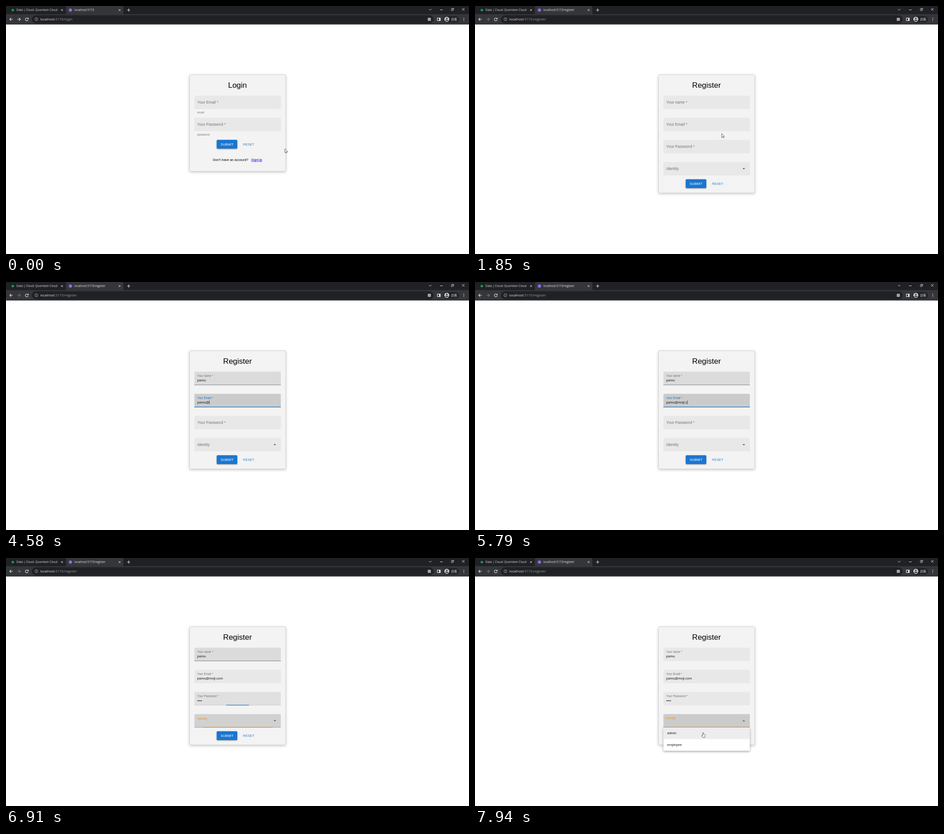
These frames come from a looping animation (1021 px wide and 549 px high, 8000 ms). An HTML page with a canvas:

```html
<!DOCTYPE html>
<html lang="en">
<head>
<meta charset="utf-8">
<title>Register form</title>
<style>
html, body { margin: 0; width: 100%; height: 100%; overflow: hidden; background: #fff; }
canvas { display: block; }
</style>
</head>
<body>
<canvas id="stage" width="1021" height="549"></canvas>
<script>
const ctx = document.getElementById('stage').getContext('2d');
const LOOP = 8000, OPEN_PAGE = 1620, OPEN_MENU = 7580;
const SANS = '"Liberation Sans", Arial, sans-serif';
const UI = '"Open Sans", "Noto Sans CJK TC", "Noto Sans CJK", sans-serif';
const BLUE = '#1976d2', ORANGE = '#f0981c';

const fields = [
  { label: 'Your name *', value: 'pamu', focus: 2320, blur: 3714, hover: [1950, 7370],
    keys: [2800, 2960, 3210, 3370] },
  { label: 'Your Email *', value: 'pamu@mojl.com', focus: 3700, blur: 6154,
    keys: [3860, 3940, 4010, 4090, 4580, 4900, 5060, 5220, 5470, 5630, 5790, 5890, 6040] },
  { label: 'Your Password *', value: '••••', focus: 6140, blur: 6834,
    keys: [6430, 6510, 6590, 6750] },
  { label: 'Identity', value: '', focus: 6820, blur: Infinity, keys: [], select: true }
];

// time, x, y of the pointer tip
const path = [
  [100, 615, 316], [890, 545.5, 341], [960, 546.5, 342.5], [1040, 548, 344],
  [OPEN_PAGE, 548, 344], [2090, 540, 217], [7310, 540, 217],
  [7540, 506, 360], [7660, 505, 361], [7940, 503, 386.5]
];

const lerp = (a, b, p) => a + (b - a) * p;
const clamp = p => Math.max(0, Math.min(1, p));

// cubic-bezier(0, 0, .2, 1)
function easeOut(x) {
  if (x <= 0 || x >= 1) return clamp(x);
  let lo = 0, hi = 1, s;
  for (let i = 0; i < 18; i++) {
    s = (lo + hi) / 2;
    if (.6 * (1 - s) * s * s + s ** 3 < x) lo = s; else hi = s;
  }
  return 3 * (1 - s) * s * s + s ** 3;
}
const ramp = (t, start, ms = 200) => easeOut((t - start) / ms);
const pulse = (t, on, off) => ramp(t, on) * (1 - ramp(t, off));

function rect(x, y, w, h, color, radius = 0) {
  ctx.fillStyle = color;
  ctx.beginPath();
  ctx.roundRect(x, y, w, h, radius);
  ctx.fill();
}

function circle(x, y, r, color) {
  ctx.fillStyle = color;
  ctx.beginPath();
  ctx.arc(x, y, r, 0, 7);
  ctx.fill();
}

function text(str, x, y, size, color, font = SANS, align = 'left') {
  ctx.font = `${size}px ${font}`;
  ctx.textAlign = align;
  ctx.fillStyle = color;
  ctx.fillText(str, x, y);
}

function stroke(d, x, y, color, width = 1) {
  ctx.save();
  ctx.translate(x, y);
  ctx.strokeStyle = color;
  ctx.lineWidth = width;
  ctx.stroke(new Path2D(d));
  ctx.restore();
}

function shadow(blur, y, color) {
  ctx.shadowBlur = blur;
  ctx.shadowOffsetY = y;
  ctx.shadowColor = color;
}
const noShadow = () => shadow(0, 0, 'transparent');

function drawBrowser(register) {
  const light = '#e4e5e8', dim = '#969a9f', bar = '#35363a', dark = '#202124';
  const cross = 'M-2-2L2 2M2-2L-2 2';
  const arrow = 'M3.5 0H-3.2M0-3.4L-3.4 0L0 3.4';
  rect(0, 0, 1021, 41, dark);
  rect(0, 18, 1021, 23, bar);
  rect(132, 0, 127, 19, bar, [4, 4, 0, 0]);

  circle(15, 9, 2.6, '#13aa52');
  text('Data | Cloud: Quomben Cloud', 23, 11.4, 6.4, '#d8dadd', UI);
  stroke(cross, 123.5, 9, light);
  circle(142, 9, 3.6, '#9468f0');
  text('localhost:5173' + (register ? '/register' : ''), 151, 11.4, 6.4, light, UI);
  stroke(cross, 250.5, 9, light);
  stroke('M-3.5 0H3.5M0-3.5V3.5', 270.5, 9, light, 1.1);

  stroke('M-2.5-1.2L0 1.3L2.5-1.2', 935.5, 8, light);
  stroke('M-2.8 0H2.8', 960, 8.5, light);
  stroke('M-2.5-1.2H1.3V2.6H-2.5ZM-1-2.6H2.6V1.2', 984.5, 7.5, light, .8);
  stroke('M-2.6-2.6L2.6 2.6M2.6-2.6L-2.6 2.6', 1008.5, 7.5, light);

  stroke(arrow, 11.5, 29.5, light, 1.1);
  ctx.save();
  ctx.translate(28.5, 29.5);
  ctx.scale(-1, 1);
  stroke(arrow, 0, 0, register ? '#77797d' : light, 1.1);
  ctx.restore();
  stroke('M2.6-1.8A3.2 3.2 0 1 0 3.2 .8M3.4-3.6V-1H.8', 45.8, 29.5, light, 1.1);

  rect(57, 20.5, 886, 18, dark, 9);
  stroke('M3.3 0A3.3 3.3 0 1 1-3.3 0A3.3 3.3 0 1 1 3.3 0M0-.6V1.8M0-1.9V-1.1', 67, 29.3, '#b4b7bb', .8);
  text('localhost', 75.5, 32, 7.6, light, UI);
  text(':5173/' + (register ? 'register' : 'login'), 75.5 + ctx.measureText('localhost').width, 32, 7.6, dim, UI);

  rect(930, 26, 7, 7, '#9fa2a6', 1);
  stroke('M-3.2-2.8H3.2V2.8H-3.2Z', 954.5, 29.5, light, 1.2);
  rect(955, 26.5, 3, 6, light);
  rect(964.5, 22.5, 34.5, 14, dark, 7);
  circle(972, 29.3, 5.6, '#c4c7cb');
  circle(972, 27.6, 1.8, '#3c4043');
  rect(968.6, 30.5, 6.8, 2.6, '#3c4043', [2, 2, 1, 1]);
  text('訪客', 981.5, 32, 6.7, light, UI);
  for (const y of [26.6, 29.4, 32.2]) circle(1009.5, y, .8, light);
}

function drawCard(title, height) {
  shadow(6, 2, 'rgba(0,0,0,.22)');
  rect(404.5, 152, 212.5, height, '#f3f3f3', 2.5);
  noShadow();
  ctx.strokeStyle = '#c6c6c6';
  ctx.lineWidth = .8;
  ctx.stroke();
  text(title, 510.5, 181.3, 17, '#000', SANS, 'center');
}

function drawButtons(y) {
  shadow(2.5, 1.2, 'rgba(0,0,0,.45)');
  rect(464.7, y, 45.3, 19.3, BLUE, 2);
  noShadow();
  text('SUBMIT', 487.4, y + 12.5, 7.45, '#fff', SANS, 'center');
  text('RESET', 535.2, y + 12.5, 7.45, '#3a80c8', SANS, 'center');
}

function drawField(field, y, t) {
  const focus = pulse(t, field.focus, field.blur);
  const hover = field.hover ? pulse(t, ...field.hover) : 0;
  const active = t >= field.focus && t < field.blur;
  const accent = field.select ? ORANGE : BLUE;
  const shade = Math.round(232 - Math.max(hover * 13, focus * 29));
  rect(415.5, y, 190.5, 29.5, `rgb(${shade},${shade},${shade})`, [2, 2, 0, 0]);
  rect(415.5, y + 29, 190.5, .8, `rgba(90,90,90,${Math.max(hover, focus * .8)})`);

  // the accent line grows from and shrinks to the middle
  const w = 190.5 * focus;
  if (w) rect(510.75 - w / 2, y + 28.5, w, 1.3, field.select ? '#dc8b28' : accent);

  const shrink = ramp(t, field.focus);
  text(field.label, 421.8, y + lerp(17.4, 11.2, shrink), lerp(8.5, 6.38, shrink), active ? accent : '#747474');

  const typed = field.value.slice(0, field.keys.filter(k => t >= k).length);
  text(typed, 421.8, y + 21.8, 7.5, '#1c1c1c');
  if (active && !field.select) rect(421.8 + ctx.measureText(typed).width, y + 14.7, .7, 8.6, '#111');

  if (field.select) {
    const dir = t >= OPEN_MENU ? -1 : 1;
    ctx.fillStyle = '#555';
    ctx.fill(new Path2D(`M590 ${y + 14.8 - dir * 1.3}h5.6l-2.8 ${dir * 2.8}Z`));
  }
}

function drawMenu(t) {
  const p = ramp(t, OPEN_MENU, 250);
  if (!p) return;
  ctx.save();
  ctx.globalAlpha = p;
  ctx.translate(510.75, 375);
  ctx.scale(lerp(.75, 1, p), lerp(.56, 1, p));
  ctx.translate(-510.75, -375);
  shadow(5, 2, 'rgba(0,0,0,.35)');
  rect(415.5, 375.2, 190.5, 51.5, '#fff', 2);
  noShadow();
  rect(415.5, 375.2, 190.5, 25.6, '#ededed', [2, 2, 0, 0]);
  text('admin', 423.8, 390.4, 7.45, '#1c1c1c');
  text('employee', 423.8, 416, 7.45, '#1c1c1c');
  ctx.restore();
}

function pointerAt(t) {
  const i = path.findIndex(p => t < p[0]);
  if (i === 0) return path[0].slice(1);
  if (i < 0) return path[path.length - 1].slice(1);
  const [a, b] = [path[i - 1], path[i]];
  const p = (t - a[0]) / (b[0] - a[0]);
  const q = p * p * (3 - 2 * p);
  return [lerp(a[1], b[1], q), lerp(a[2], b[2], q)];
}

const arrowShape = new Path2D('M0 0V8.6L2 6.8L3.3 9.7L4.6 9.1L3.4 6.3H6Z');
const handShape = new Path2D('M-.9 .8Q-.9 0 0 0T.9 .8V3.6L3.6 4.3Q4.8 4.6 4.7 5.9L4 10.6H-.6L-3 7.2Q-3.2 6.1-2.2 6.1L-.9 7Z');

function drawPointer(t) {
  if (t >= 2800 && t < 7310) return;
  const [x, y] = pointerAt(t);
  if (t >= 1950 && t < 7400) {
    stroke('M-1.6-5H1.6M0-5V5M-1.6 5H1.6', x, y, '#333', .8);
    return;
  }
  const hand = t >= 700 && t < OPEN_PAGE || t >= 7400;
  const shape = hand ? handShape : arrowShape;
  ctx.save();
  ctx.translate(x, y);
  ctx.fillStyle = '#fff';
  ctx.strokeStyle = '#222';
  ctx.lineWidth = .7;
  ctx.fill(shape);
  ctx.stroke(shape);
  ctx.restore();
}

function drawLogin() {
  drawCard('Login', 214);
  [['Your Email *', 'email'], ['Your Password *', 'password']].forEach(([label, hint], i) => {
    const y = 198.5 + i * 49;
    rect(415.5, y, 190.5, 29.5, '#e8e8e8', [2, 2, 0, 0]);
    text(label, 421.8, y + 17.4, 8.5, '#747474');
    text(hint, 421.8, y + 39.3, 6.38, '#7c7c7c');
  });
  drawButtons(296.2);
  text("Don't have an account?", 456.3, 343.1, 7.45, '#000');
  text('SignUp', 540.6, 343.1, 7.45, '#0000e0');
  rect(540.6, 343.9, 24.4, .6, '#0000e0');
}

function drawRegister(t) {
  drawCard('Register', 262);
  drawButtons(383.6);
  fields.forEach((field, i) => drawField(field, 198.5 + i * 49, t));
  drawMenu(t);
}

function draw(t) {
  const register = t >= OPEN_PAGE;
  ctx.fillStyle = '#fff';
  ctx.fillRect(0, 0, 1021, 549);
  drawBrowser(register);
  if (register) drawRegister(t); else drawLogin();
  drawPointer(t);
}

let start;
function tick(now) {
  start ??= now;
  draw((now - start) % LOOP);
  requestAnimationFrame(tick);
}
requestAnimationFrame(tick);
</script>
</body>
</html>
```
